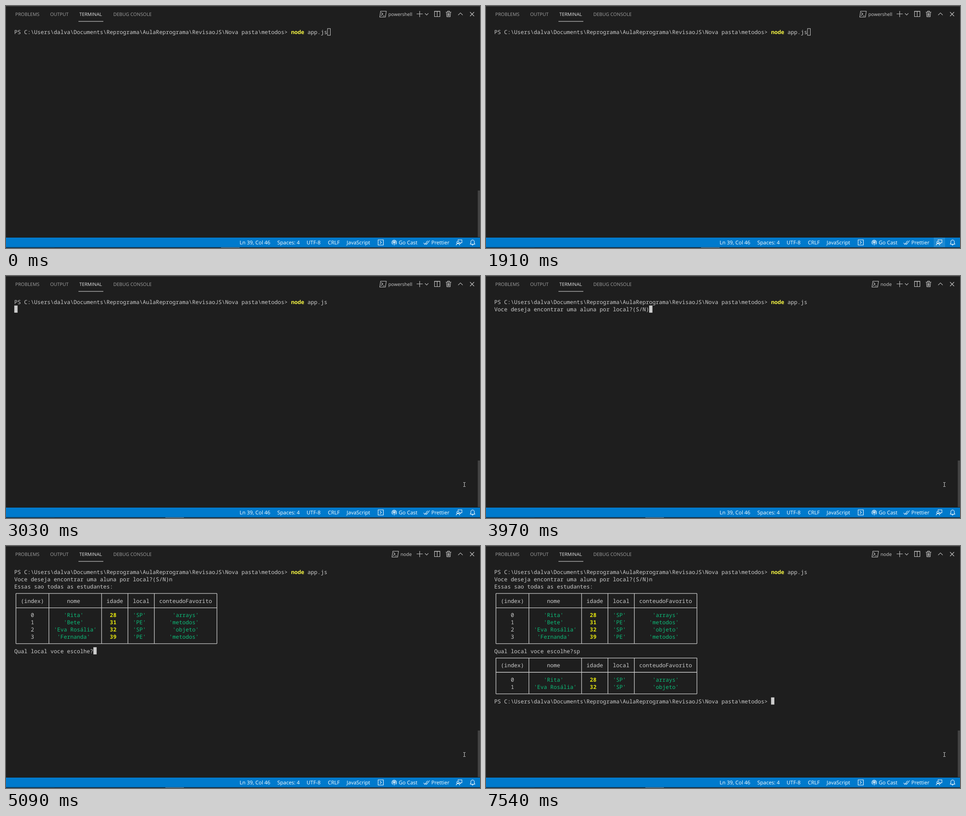
Recreate the animation shown at these times as an HTML page. Size 1047 px wide and 535 px high, loop 8 s.

```html
<!DOCTYPE html>
<html lang="pt">
<head>
<meta charset="utf-8">
<title>Terminal</title>
<style>
  html, body { margin: 0; width: 100%; height: 100%; overflow: hidden; background: #1e1e1e; }
  svg { display: block; width: 100%; height: 100%; }
  text { font-family: "Open Sans", "Noto Sans", sans-serif; text-rendering: geometricPrecision; }
  .tabs text { font-size: 10.35px; fill: #a0a0a0; }
  .tabs .active { fill: #e7e7e7; }
  .status text { font-size: 11.45px; fill: #fff; }
  .icons { fill: none; stroke: #c5c5c5; stroke-width: 1.1; }
  .status .icons { stroke: #fff; }
  #terminal text { font: 12.13px "Noto Sans Mono", "DejaVu Sans Mono", monospace; fill: #ccc; }
  #terminal .string { fill: #0dbc79; }
  #terminal .number { fill: #e5e510; font-weight: bold; }
  #terminal .command { fill: #f5f543; font-weight: bold; }
  #terminal path { fill: none; stroke: #ccc; stroke-width: 1.3; }
</style>
</head>
<body>
<svg viewBox="0 0 1047 535">
  <rect width="1047" height="535" fill="#1e1e1e"/>
  <rect width="1047" height="1" fill="#414141"/>

  <g class="tabs">
    <text x="20.5" y="22.3">PROBLEMS</text>
    <text x="97.5" y="22.3">OUTPUT</text>
    <text x="162" y="22.3" class="active">TERMINAL</text>
    <text x="237" y="22.3">DEBUG CONSOLE</text>
    <rect x="160" y="33.5" width="55" height="1" fill="#e7e7e7"/>
    <text x="844.5" y="22.3" style="fill:#ccc" data-to="3970">powershell</text>
    <text x="871.5" y="22.3" style="fill:#ccc" data-from="3970">node</text>
  </g>
  <g class="icons">
    <path id="shell" d="M827.5 11.5H840L838 24.5H825.5ZM829 14.5l3.5 3.3-4.4 3.4M832.5 21.7h4"/>
    <path d="M907 17.5h13.5M913.7 11v13.5M925.5 16.2l3.7 3.7 3.7-3.7"/>
    <path d="M946.5 11.5h12v12h-12ZM952.5 11.5v12M946.5 12h12"/>
    <path d="M971.5 13.5h12M975.5 13v-1.8h4v1.8M973 14l.8 9.6h7.4l.8-9.6M975.8 15.5v6.5M977.5 15.5v6.5M979.2 15.5v6.5"/>
    <path d="M998.8 20.2l5-5 5 5M1025 13.5l9 9M1034 13.5l-9 9"/>
  </g>

  <g id="terminal"></g>
  <rect id="caret"/>
  <rect id="scrollbar" x="1042" y="408" width="5" height="103" fill="#424242"/>

  <rect y="512" width="1047" height="23" fill="#007acc"/>
  <rect x="989" y="512" width="25" height="21" fill="#fff" opacity=".12" data-from="1910" data-to="1980"/>
  <rect x="1014" y="512" width="33" height="21" fill="#fff" opacity=".12" data-from="410" data-to="480"/>
  <g class="status">
    <text x="516" y="527">Ln 39, Col 46</text>
    <text x="599.3" y="527">Spaces: 4</text>
    <text x="664" y="527">UTF-8</text>
    <text x="711" y="527">CRLF</text>
    <text x="752.5" y="527">JavaScript</text>
    <text x="867.5" y="527">Go Cast</text>
    <text x="939.5" y="527">Prettier</text>
    <g class="icons">
      <path d="M822 517h11.5v11.5H822ZM826 519.7l3.2 3.1-3.2 3.1"/>
      <path d="M854.5 527a5.2 5.2 0 1 1 6 0M855.8 524.6a2.8 2.8 0 1 1 3.4 0M857.5 522.5v6.5"/>
      <circle cx="857.5" cy="522.5" r="1" fill="#fff"/>
      <path d="M922.5 523.5l2.8 3.5 6-8M927.5 525.5l1.5 1.5 6.5-8.5"/>
      <path d="M998.5 519v-2h8.5v6.5h-2l-2 2v-2h-1.5M994.5 529q0-3.8 3.8-3.8t3.8 3.8"/>
      <circle cx="998.3" cy="522.5" r="2.3"/>
      <path d="M1025.5 526.5l1.3-2.5v-3a3.8 3.8 0 0 1 7.6 0v3l1.3 2.5ZM1029 527a1.6 1.6 0 0 0 3.2 0"/>
    </g>
  </g>
  <rect y="533.4" width="1047" height="1.6" fill="#17242f"/>
  <rect y="533.4" width="107" height="1.6" fill="#103a57"/>
  <rect id="task" y="533.4" width="41" height="1.6" fill="#4d6b80"/>

  <g id="tooltip">
    <rect x="1014.5" y="522.5" width="40" height="20" fill="#fff" stroke="#767676"/>
    <text x="1019" y="537" font-size="9.6" fill="#575757">Parar</text>
  </g>
  <circle id="click" cx="1011" cy="460.5" r="10" fill="#85830f"/>
  <path data-from="1980" fill="none" stroke="#d0d0d0" d="M1010 456.5h2l.5.5.5-.5h2M1012.5 457v8M1010 465.5h2l.5-.5.5.5h2"/>
</svg>

<script>
const LOOP = 8000, LEFT = 18.3, CELL = 7.278, TOP = 49.4, LINE = 15.85;
const byId = id => document.getElementById(id);
const terminal = byId('terminal');
const colX = col => LEFT + col * CELL;
const rowY = row => TOP + row * LINE;

function add(tag, attrs, content = '') {
  const node = document.createElementNS('http://www.w3.org/2000/svg', tag);
  for (const key in attrs) node.setAttribute(key, attrs[key]);
  node.textContent = content;
  terminal.append(node);
}

function print(from, row, col, text, kind = '', to = LOOP) {
  add('text', { x: colX(col), y: rowY(row) + 12.8, class: kind, 'data-from': from, 'data-to': to }, text);
}

const headers = ['(index)', 'nome', 'idade', 'local', 'conteudoFavorito'];
const widths = [9, 15, 7, 7, 18];
const kinds = ['', 'string', 'number', 'string', 'string'];
const students = [
  ["'Rita'", '28', "'SP'", "'arrays'"],
  ["'Bete'", '31', "'PE'", "'metodos'"],
  ["'Eva Rosália'", '32', "'SP'", "'objeto'"],
  ["'Fernanda'", '39', "'PE'", "'metodos'"],
];

function printTable(from, row, records) {
  const middle = r => rowY(r) + LINE / 2;
  const edge = col => colX(col + 0.5);
  const top = middle(row), bottom = middle(row + 3 + records.length);
  let path = [top, middle(row + 2), bottom].map(y => `M${edge(0)} ${y}H${edge(61)}`).join('');
  path += `M${edge(0)} ${top}V${bottom}`;
  let col = 0;
  widths.forEach((width, i) => {
    const cell = (r, text, kind) =>
      print(from, r, col + 1 + Math.floor((width - text.length) / 2), text, kind);
    cell(row + 1, headers[i]);
    records.forEach((record, n) => cell(row + 3 + n, [String(n), ...record][i], kinds[i]));
    col += width + 1;
    path += `M${edge(col)} ${top}V${bottom}`;
  });
  add('path', { d: path, 'data-from': from });
}

const prompt = 'PS C:\\Users\\dalva\\Documents\\Reprograma\\AulaReprograma\\RevisaoJS\\Nova pasta\\metodos>';
print(0, 0, 0, prompt);
print(0, 0, 84, 'node', 'command');
print(0, 0, 89, 'app.js');
print(3160, 1, 0, 'Voce deseja encontrar uma aluna por local?(S/N)');
print(4830, 1, 47, 'n');
print(5090, 2, 0, 'Essas sao todas as estudantes:');
printTable(5090, 3, students);
print(5090, 11, 0, 'Qual local voce escolhe?');
print(6940, 11, 24, 's');
print(7210, 11, 25, 'p');
printTable(7540, 12, students.filter(s => s[2] === "'SP'"));
print(7540, 18, 0, prompt);

// Each step is [start time, ...value]; the latest one reached applies.
const at = (steps, t) => steps.findLast(([start]) => t >= start).slice(1);
const caretSteps = [[0, 0, 95], [3030, 1, 0], [3160, 1, 47], [4830, 1, 48],
  [5090, 11, 24], [6940, 11, 25], [7210, 11, 26], [7540, 18, 84]];
const opacity = {
  scrollbar: [[0, 1], [480, .5], [550, 0], [1980, .5], [2040, 1]],
  tooltip: [[0, 0], [760, .5], [790, 1], [1910, 0]],
  click: [[0, 0], [2240, 1], [2310, .5], [2370, 0]],
};
const timed = [...document.querySelectorAll('[data-from], [data-to]')];

function setAll(node, attrs) {
  for (const key in attrs) node.setAttribute(key, attrs[key]);
}

function draw(t) {
  for (const node of timed) {
    const { from = 0, to = LOOP } = node.dataset;
    node.style.display = t >= +from && t < +to ? '' : 'none';
  }
  for (const id in opacity) byId(id).style.opacity = at(opacity[id], t)[0];

  const focused = t >= 2310;
  const [row, col] = at(caretSteps, t);
  const inset = focused ? 0 : .5;
  setAll(byId('caret'), {
    x: colX(col) + inset, y: rowY(row) + inset,
    width: CELL - 2 * inset, height: LINE - 2 * inset,
    fill: focused ? '#ccc' : 'none', stroke: focused ? 'none' : '#ccc',
  });
  byId('task').setAttribute('x', focused ? 352 : 475);
  byId('shell').setAttribute('transform', `translate(${t < 3970 ? 0 : 27})`);
}

const start = performance.now();
function frame() {
  draw((performance.now() - start) % LOOP);
  requestAnimationFrame(frame);
}
frame();
</script>
</body>
</html>
```
